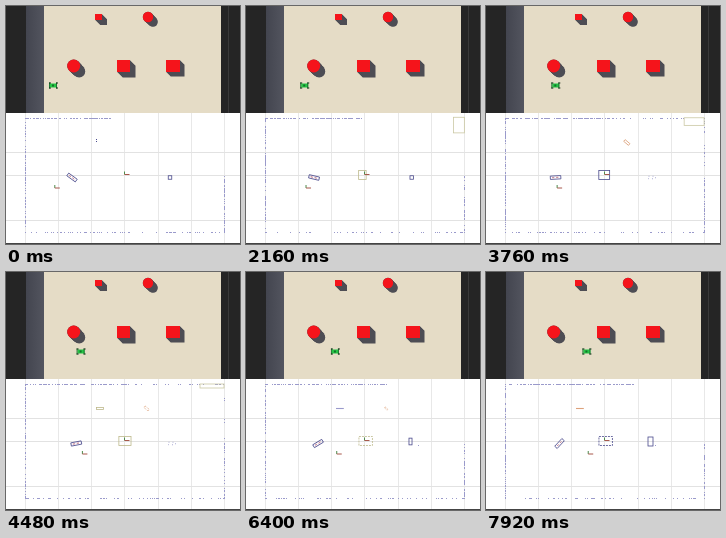
An HTML page with a canvas that plays this animation: 234x238 px, repeating every 8 s.

```html
<!DOCTYPE html>
<html lang="en">
<head>
<meta charset="utf-8">
<title>Robot and lidar map</title>
<style>
html, body { margin: 0; width: 234px; height: 238px; overflow: hidden; background: #fff; }
canvas { display: block; }
</style>
</head>
<body>
<canvas id="stage" width="234" height="238"></canvas>
<script>
const ctx = document.getElementById('stage').getContext('2d');
const LOOP = 8000, STEP = 80;
const navy = '#4a4a8c', lavender = '#9a9acb', olive = '#bdb98c', orange = '#dda27c';
const shadow = '#4d4d54', red = '#f5141b';

const mix = (a, b, k) => a + (b - a) * k;
const ramp = (t, from, to) => Math.min(1, Math.max(0, (t - from) / (to - from)));
const smooth = k => k * k * (3 - 2 * k);

function random(seed) {
  const s = Math.sin(seed * 12.9898) * 43758.5453;
  return s - Math.floor(s);
}

function rect(x, y, w, h, color) {
  ctx.fillStyle = color;
  ctx.fillRect(x, y, w, h);
}

function line(x1, y1, x2, y2, color) {
  ctx.strokeStyle = color;
  ctx.lineWidth = 1;
  ctx.beginPath();
  ctx.moveTo(x1, y1);
  ctx.lineTo(x2, y2);
  ctx.stroke();
}

function disc(x, y, r, color) {
  ctx.fillStyle = color;
  ctx.beginPath();
  ctx.arc(x, y, r, 0, 7);
  ctx.fill();
}

function box(x, y, w, h, angle, color, dash = []) {
  ctx.save();
  ctx.translate(x, y);
  ctx.rotate(angle * Math.PI / 180);
  ctx.setLineDash(dash);
  ctx.strokeStyle = color;
  ctx.lineWidth = 0.8;
  ctx.strokeRect(-w / 2, -h / 2, w, h);
  ctx.restore();
}

function cube(x, y, w, h, depth) {
  for (let d = 0; d <= depth; d += 0.5) rect(x + d, y + d, w, h, shadow);
  rect(x, y, w, h, red);
}

function cylinder(x, y, r, depth) {
  for (let d = 0; d <= depth; d += 0.5) disc(x + d, y + d, r - d / 12, shadow);
  disc(x, y, r, red);
}

function drawRoom() {
  rect(0, 0, 234, 107, '#252525');
  const wall = ctx.createLinearGradient(20, 0, 38, 0);
  wall.addColorStop(0, '#43454f');
  wall.addColorStop(1, '#53555f');
  rect(20, 0, 18, 107, wall);
  rect(38, 0, 177, 107, '#e5dcc6');
  rect(222, 0, 1, 107, '#3a3a3a');
  cube(89, 8, 7, 6, 5);
  cylinder(142, 11, 5.2, 5);
  cylinder(67.7, 60, 6.5, 5.5);
  cube(111, 54, 13, 12, 5.5);
  cube(160, 54, 14, 12, 4.5);
}

function drawRobot(x, y) {
  rect(x - 3, y - 2, 7, 4, '#25c545');
  for (const dx of [-4, 3]) {
    rect(x + dx, y - 3, 1, 6, '#1d7a34');
    rect(x + dx, y - 3, 2, 1, '#122c17');
    rect(x + dx, y + 2, 2, 1, '#122c17');
  }
  rect(x - 1, y - 1, 2, 2, '#12702a');
}

function drawAxes(x, y) {
  line(x, y, x, y - 3, '#4d8a4b');
  line(x, y, x + 5, y, '#a8584c');
}

function drawGrid() {
  rect(0, 107, 234, 131, '#fff');
  for (let i = 0; i < 7; i++) rect(Math.round(18.5 + i * 33.3), 107, 1, 130, '#e8e8e8');
  for (const y of [146, 169, 214]) rect(0, y, 234, 1, '#e2e2e2');
  rect(0, 237, 234, 1, '#444');
}

// Scatter lidar hits along a wall.
function scan(x1, y1, x2, y2, density, seed) {
  const n = Math.round(Math.hypot(x2 - x1, y2 - y1));
  for (let i = 0; i <= n; i++) {
    if (random(seed + i * 1.37) > density) continue;
    rect(Math.round(mix(x1, x2, i / n)), Math.round(mix(y1, y2, i / n)), 1, 1, lavender);
  }
}

function drawWalls(t) {
  const seed = t / STEP * 3.1;
  const topEnd = 105 + t * 0.0055;
  scan(19, 112, topEnd, 112, 0.6, seed);
  scan(19, 113, 19, 226, 0.5, seed + 20);
  scan(19, 226, 218, 226, 0.22, seed + 40);
  scan(218, 170, 218, 226, 0.5, seed + 60);
  if (t > 2200 && t < 6200) {
    scan(topEnd, 112, 218, 112, 0.25, seed + 80);
    scan(218, 113, 218, 170, 0.2, seed + 100);
  }
}

function drawObstacles(t) {
  // The nearby pillar turns as the robot passes it.
  const s = t / 1000;
  const px = 66 + 0.95 * s, angle = 36 - 10.5 * s;
  box(px, 171.5, 10.5, 3.3, angle, navy);
  box(px, 171.5, 7, 0.3, angle, '#c98a9a', [2, 2]);

  if (t >= 640) {
    const k = smooth(ramp(t, 0, 6000));
    const color = Math.floor(t / 1300) % 4 === 2 ? navy : olive;
    box(115 + 4.7 * k, 169, 5 + 8.5 * k, 9, 0, color, t > 6200 ? [2, 1] : []);

    const c = ramp(t, 1280, 4480);
    if (t < 5100) {
      box(mix(215.5, 206, c), mix(121, 114, c), mix(6, 24, c), mix(20, 4, c), 0, '#cbc8a4');
    }
  } else {
    rect(90, 133, 1, 1, navy);
    rect(90, 135, 1, 1, navy);
  }

  if (t < 2200) {
    box(164 + s * 0.8, 171.5, 3.5, 3.5, 0, navy);
  } else if (t < 5100) {
    box(166, 171.5, 7, 2.5, 0, lavender, [1, 3]);
  } else {
    const k = ramp(t, 5600, 7900);
    box(164.5, 169.5, mix(2, 5, k), mix(5.5, 9, k), 0, navy);
    scan(168, 173, 174, 173, 0.35, t / STEP);
  }

  if (t >= 3800) {
    const color = t < 6200 ? olive : t < 7500 ? lavender : orange;
    box(94, 136.5, 7, t < 6200 ? 2 : 0.3, 0, color);
  }
  if (t >= 2200 && t < 7500) {
    const k = ramp(t, 3000, 7000);
    box(141 - k, 136.5, mix(7, 3, k), mix(2.5, 1, k), 40, orange, t > 3800 ? [1, 1] : []);
  }
}

function draw(t) {
  const s = t / 1000;
  const x = 47 + 7.6 * s - 6.8 * (1 - Math.exp(-s / 1.5));
  drawRoom();
  drawRobot(x, 79.5);
  drawGrid();
  drawWalls(t);
  drawObstacles(t);
  drawAxes(118.5, 168.5);
  drawAxes(x + 1.8, 182);
}

function frame(now) {
  const step = Math.floor(now % LOOP / STEP);
  draw(step < 2 ? 0 : step * STEP);
  requestAnimationFrame(frame);
}
requestAnimationFrame(frame);
</script>
</body>
</html>
```
